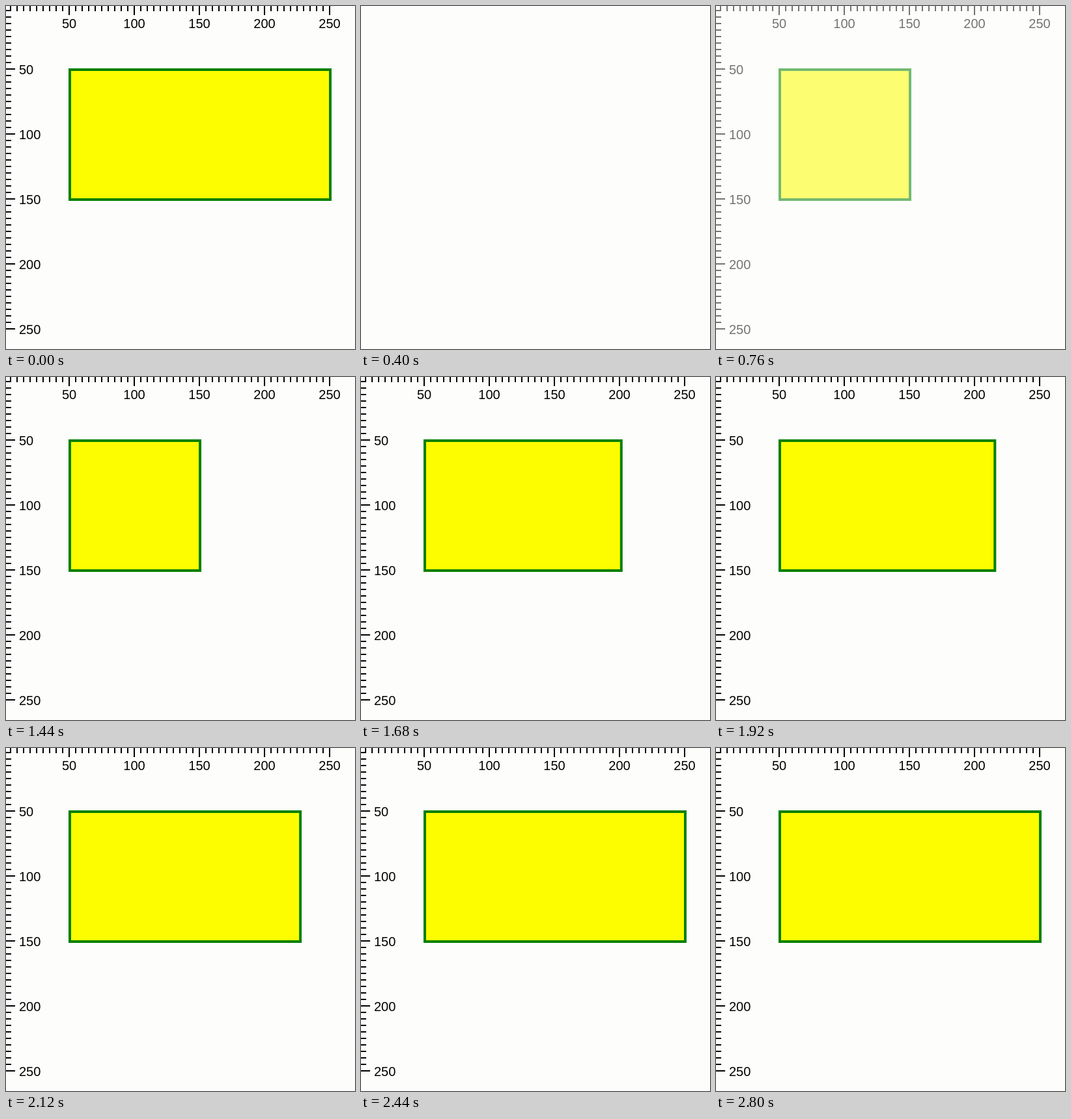
These frames come from a looping animation (536 px wide and 528 px high, 2.84 s). An HTML page with a canvas:

```html
<!DOCTYPE html>
<html lang="en">
<head>
<meta charset="utf-8">
<title>Growing rectangle</title>
<style>
  html, body { margin: 0; width: 100%; height: 100%; overflow: hidden; background: #fdfdfb; }
  canvas { display: block; }
</style>
</head>
<body>
<canvas id="stage" width="536" height="528"></canvas>
<script>
const ctx = document.getElementById('stage').getContext('2d');
const LOOP = 2840;
const STEP = 40;
const PAPER = '#fdfdfb';

// Keyframes as [time in ms, value]
const OPACITY = [[0, 1], [400, 0], [520, 0], [960, 1]];
const WIDTH = [[0, 200], [480, 200], [480, 100], [1480, 100], [1665, 150], [2220, 183], [2405, 200]];

function valueAt(keys, t) {
  const next = keys.findIndex(key => key[0] > t);
  if (next < 0) return keys[keys.length - 1][1];
  const [t0, v0] = keys[next - 1];
  const [t1, v1] = keys[next];
  return v0 + (v1 - v0) * (t - t0) / (t1 - t0);
}

// Units map to pixels at a scale of two
const toPx = unit => unit * 2 - 3;

function fillStage() {
  ctx.fillStyle = PAPER;
  ctx.fillRect(0, 0, 536, 528);
}

function drawRulers() {
  ctx.fillStyle = '#000';
  ctx.font = '20px "Liberation Sans", Arial, sans-serif';
  for (let unit = 5; unit <= 250; unit += 5) {
    const pos = toPx(unit);
    const major = unit % 50 === 0;
    const length = major ? 14 : 8;
    ctx.fillRect(pos - 1, 0, 2, length);
    ctx.fillRect(0, pos - 1, length, 2);
    if (major) {
      ctx.textAlign = 'center';
      ctx.fillText(unit, pos, 34);
      ctx.textAlign = 'left';
      ctx.fillText(unit, 20, pos + 8);
    }
  }
}

function drawBox(width) {
  ctx.fillStyle = '#fdfd00';
  ctx.strokeStyle = '#008000';
  ctx.lineWidth = 4;
  ctx.beginPath();
  ctx.rect(98, 98, width * 2, 200);
  ctx.fill();
  ctx.stroke();
}

function render(t) {
  const opacity = valueAt(OPACITY, t);
  fillStage();
  if (opacity === 0) return;
  drawRulers();
  drawBox(valueAt(WIDTH, t));
  // Fade the whole picture evenly towards the background
  ctx.globalAlpha = 1 - opacity;
  fillStage();
  ctx.globalAlpha = 1;
}

const start = performance.now();
function tick() {
  const t = (performance.now() - start) % LOOP;
  render(Math.floor(t / STEP) * STEP);
  requestAnimationFrame(tick);
}
tick();
</script>
</body>
</html>
```
